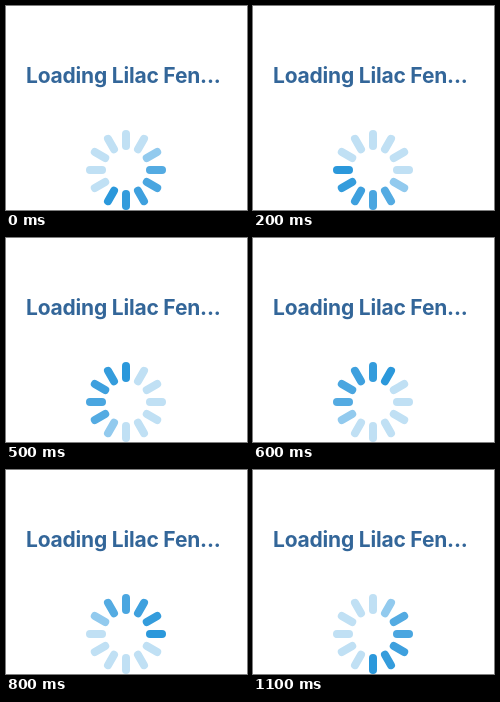
An HTML page for the animation above (1200 ms loop, 241 by 204 pixels).

```html
<!DOCTYPE html>
<html lang="en">
<head>
<meta charset="utf-8">
<title>Loading</title>
<style>
  html, body { margin: 0; width: 100%; height: 100%; overflow: hidden; background: #fff; }
  svg { display: block; }
  text { font: 700 21px Inter, "Open Sans", sans-serif; letter-spacing: -.2px; fill: #336699; }
  line { stroke-width: 8; stroke-linecap: round; }
</style>
</head>
<body>
<svg width="241" height="204" viewBox="0 0 241 204">
  <text x="20" y="77">Loading Lilac Fen...</text>
  <g id="spinner" transform="translate(120 164)"></g>
</svg>
<script>
  const SPOKES = 12, STEP_MS = 100, START = 7;
  // Colours from the leading spoke back to the end of the tail
  const TAIL = ['#2b98db', '#349cdc', '#3ea0de', '#4aa6e0', '#54abe2', '#92caee'];
  const IDLE = '#c0e0f4';

  const spinner = document.getElementById('spinner');
  const spokes = Array.from({ length: SPOKES }, (_, i) => {
    const line = document.createElementNS('http://www.w3.org/2000/svg', 'line');
    line.setAttribute('y1', -24);
    line.setAttribute('y2', -36);
    line.setAttribute('transform', `rotate(${i * 360 / SPOKES})`);
    return spinner.appendChild(line);
  });

  const startTime = performance.now();

  function draw() {
    const elapsed = performance.now() - startTime;
    const head = START + Math.floor(elapsed / STEP_MS) % SPOKES;
    spokes.forEach((spoke, i) => {
      const age = (head - i + SPOKES) % SPOKES;
      spoke.setAttribute('stroke', TAIL[age] || IDLE);
    });
    requestAnimationFrame(draw);
  }
  draw();
</script>
</body>
</html>
```
